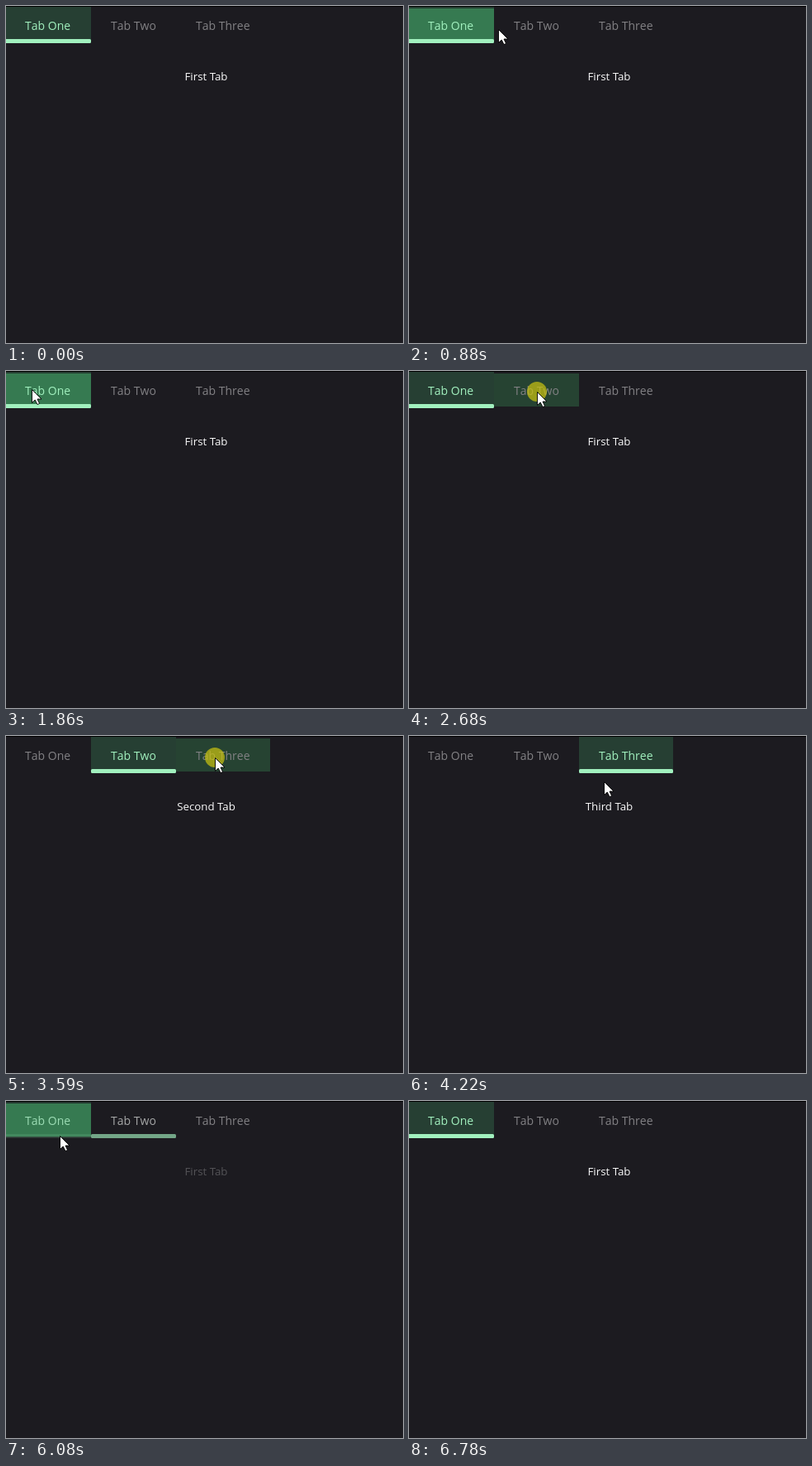
An HTML page for the animation above (7110 ms loop, 481 by 408 pixels).

```html
<!DOCTYPE html>
<html lang="en">
<head>
<meta charset="utf-8">
<title>Tabs</title>
<style>
  html, body { margin: 0; width: 100%; height: 100%; overflow: hidden; background: #1c1b20; }
  svg { display: block; width: 100vw; height: 100vh; }
  text { font-family: "Open Sans", "Noto Sans", sans-serif; }
  .label { font-size: 14px; font-kerning: none; }
  .page { font-size: 13.3px; fill: #fafafa; text-anchor: middle; }
</style>
</head>
<body>
<svg id="stage" viewBox="0 0 481 408"></svg>
<script>
const LOOP = 7110, START = 118, STEP = 69.2, LEAVE = 6750;
const FADE = 280, HOVER_LAG = 70, PRESS = 150, RELEASE = 30, PAD = 24;
const MINT = [161, 240, 190], GRAY = [130, 129, 132], PALE = [178, 180, 179];

const tabs = [
  { label: 'Tab One', page: 'First Tab', w: 104 },
  { label: 'Tab Two', page: 'Second Tab', w: 103 },
  { label: 'Tab Three', page: 'Third Tab', w: 114 }
];

const clicks = [
  { at: 2780, tab: 1 }, { at: 3710, tab: 2 }, { at: 5170, tab: 1 }, { at: 6000, tab: 0 }
];

// eased pointer moves; it rests between them
const enter = { x: 314, y: 340 };
const moves = [
  { from: 118, to: 640, x: 62, y: 27 },
  { from: 660, to: 1320, x: 240, y: 32 },
  { from: 1320, to: 1848, x: 31, y: 22 },
  { from: 1930, to: 2500, x: 155, y: 25 },
  { from: 3050, to: 3540, x: 253, y: 26 },
  { from: 3680, to: 3820, x: 236, y: 55 },
  { from: 4400, to: 4960, x: 148, y: 26 },
  { from: 5100, to: 5239, x: 137, y: 87 },
  { from: 5420, to: 5860, x: 49, y: 26 },
  { from: 5980, to: 6700, x: 437, y: 396 }
];

const stage = document.getElementById('stage');

function set(el, attrs) {
  for (const key in attrs) el.setAttribute(key, attrs[key]);
}

function add(tag, attrs, text) {
  const el = document.createElementNS('http://www.w3.org/2000/svg', tag);
  set(el, attrs);
  if (text) el.textContent = text;
  return stage.appendChild(el);
}

const clamp = v => Math.max(0, Math.min(1, v));
const smooth = p => p * p * (3 - 2 * p);
const lerp = (a, b, p) => a + (b - a) * p;
const rgb = c => `rgb(${c.map(Math.round)})`;
const mix = (a, b, p) => rgb(a.map((v, i) => lerp(v, b[i], p)));

function pointer(t) {
  if (t < START || t >= LEAVE) return null;
  return moves.reduce((at, m) => {
    const p = smooth(clamp((t - m.from) / (m.to - m.from)));
    return { x: lerp(at.x, m.x, p), y: lerp(at.y, m.y, p) };
  }, enter);
}

add('rect', { width: 481, height: 408, fill: '#1c1b20' });
add('rect', { width: 481, height: 1, fill: '#000' });
let left = -1;
for (const tab of tabs) {
  const x = tab.x = left, width = tab.w;
  left += width;
  tab.back = add('rect', { x, y: 1, width, height: 43, fill: '#263f33' });
  tab.hover = add('rect', { x, y: 3, width, height: 40 });
  tab.bar = add('rect', { x, y: 40, width, height: 5, rx: 1.5, fill: rgb(MINT) });
  tab.text = add('text', { x: x + PAD, y: 29, class: 'label' }, tab.label);
  tab.body = add('text', { x: 242.5, y: 90, class: 'page' }, tab.page);
}
const ring = add('circle', { r: 12, fill: '#c8c010', 'fill-opacity': 0.72 });
const arrow = add('path', {
  d: 'M.5 .5V16.5L4.2 13 7 18.6 9.6 17.4 7 12H12Z',
  fill: '#fff', stroke: '#000', 'stroke-width': 0.9
});

function drawTab(tab, on, leaving, over, p) {
  const rise = clamp(0.7 + p / 2);
  set(tab.back, { opacity: on ? rise : 0 });
  set(tab.hover, { opacity: over ? 1 : 0, fill: on ? '#367a51' : '#264332' });
  set(tab.bar, { opacity: on ? p ** 1.5 : leaving ? clamp(1 - p * 1.4) : 0 });
  set(tab.text, { fill: on ? mix(GRAY, MINT, rise) : leaving ? mix(PALE, GRAY, p) : rgb(GRAY) });
  set(tab.body, { opacity: on ? p : 0 });
}

function draw(time) {
  const t = START + Math.floor((time - START) / STEP) * STEP;
  const done = clicks.filter(c => c.at <= t);
  const [previous, current] = [{ tab: -1 }, { at: -FADE * 2, tab: 0 }, ...done].slice(-2);
  const p = clamp((t - current.at) / FADE);
  const at = pointer(t), past = pointer(t - HOVER_LAG);

  tabs.forEach((tab, i) => {
    const over = past && past.y >= 3 && past.y < 43 && past.x >= tab.x && past.x < tab.x + tab.w;
    drawTab(tab, i === current.tab, i === previous.tab && p < 1, over, p);
  });

  const down = at && clicks.some(c => t >= c.at - PRESS && t < c.at - RELEASE);
  set(ring, { visibility: down ? 'visible' : 'hidden' });
  set(arrow, { visibility: at ? 'visible' : 'hidden' });
  if (at) {
    const transform = `translate(${Math.round(at.x)} ${Math.round(at.y)})`;
    set(ring, { transform });
    set(arrow, { transform });
  }
}

const begin = performance.now();
function tick() {
  draw((performance.now() - begin) % LOOP);
  requestAnimationFrame(tick);
}
tick();
</script>
</body>
</html>
```
